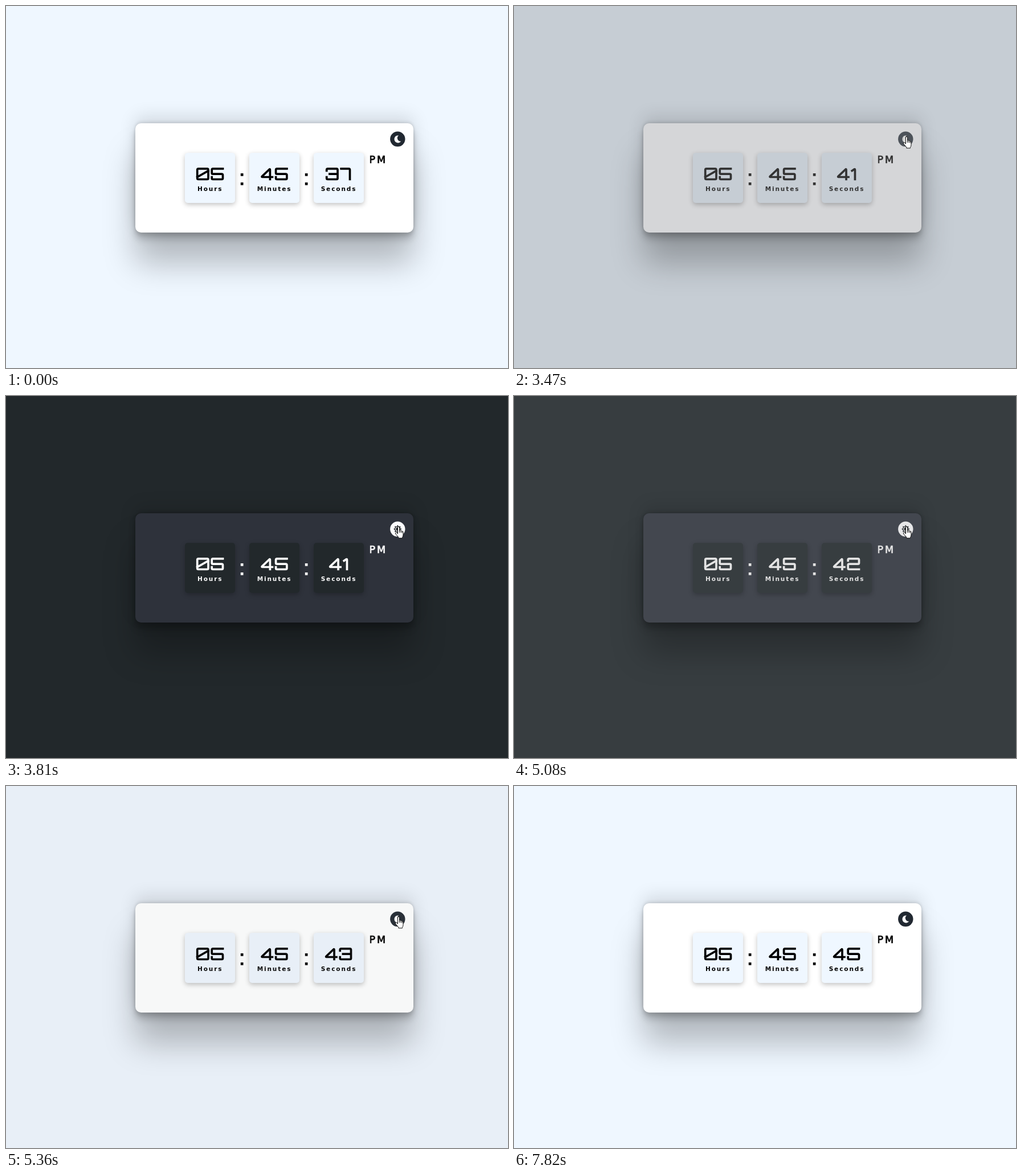
These frames come from a looping animation (881x636 px, 8.15 s). An HTML page:

```html
<!DOCTYPE html>
<html lang="en">
<head>
<meta charset="utf-8">
<title>Digital clock</title>
<style>
  html, body { margin: 0; width: 100%; height: 100%; overflow: hidden; }
  body { position: relative; background: var(--bg); }
  .card, .tile, svg { position: absolute; }
  .card {
    left: 227px; top: 206px; width: 488px; height: 192px;
    border-radius: 10px; background: var(--card);
    box-shadow: rgba(0,0,0,.25) 0 54px 55px, rgba(0,0,0,.12) 0 -12px 30px,
      rgba(0,0,0,.12) 0 4px 6px, rgba(0,0,0,.17) 0 12px 13px, rgba(0,0,0,.09) 0 -3px 5px;
  }
  .tile {
    top: 52px; width: 88px; height: 88px; border-radius: 5px;
    background: var(--bg); box-shadow: rgba(0,0,0,.24) 0 3px 8px;
  }
  svg { left: 0; top: 0; }
  text { font-family: "DejaVu Sans", sans-serif; fill: var(--fg); }
  .label { font-size: 10.5px; font-weight: bold; letter-spacing: 1.9px; text-anchor: middle; }
  .period { font-size: 17.5px; letter-spacing: 3px; stroke: var(--fg); stroke-width: .7px; }
  .digits path {
    fill: none; stroke: var(--fg); stroke-width: 3.7;
    stroke-linecap: square; stroke-linejoin: round;
  }
  .dots { fill: var(--fg); }
</style>
</head>
<body>
<div class="card">
  <div class="tile" style="left:87px"></div>
  <div class="tile" style="left:200px"></div>
  <div class="tile" style="left:313px"></div>
</div>
<svg width="881" height="636" viewBox="0 0 881 636">
  <g class="digits" id="hours" role="img"></g>
  <g class="digits" id="minutes" role="img"></g>
  <g class="digits" id="seconds" role="img"></g>
  <text class="label" x="358.2" y="324.7">Hours</text>
  <text class="label" x="471" y="324.7">Minutes</text>
  <text class="label" x="584" y="324.7">Seconds</text>
  <text class="period" x="637.4" y="275.7">PM</text>
  <path class="dots" d="M411.8 294h4.7v4.7h-4.7zm0 16h4.7v4.7h-4.7zM524.8 294h4.7v4.7h-4.7zm0 16h4.7v4.7h-4.7z"/>

  <circle cx="687.3" cy="233.8" r="13.2" fill="var(--btn)"/>
  <path id="moon" fill="var(--icon)" d="M689 227.5A6.5 6.5 0 1 0 693.3 237.6A5.7 5.7 0 0 1 689 227.5z"/>
  <g id="sun" transform="translate(687.3 233.8)">
    <path id="rays" fill="var(--icon)"/>
    <circle r="3.6" fill="none" stroke="var(--btn)" stroke-width="1.1"/>
  </g>

  <g id="cursor" stroke="#111" stroke-linejoin="round" fill="#fff">
    <path id="arrow" d="M.5 .7V15.2L3.8 12l2 4.6 2.2-1-2-4.4h4.2z"/>
    <g id="hand" transform="translate(-6.5 0)">
      <path d="M5 13V2Q5 .5 6.5 .5T8 2v5q1.7-.9 2.4.8 1.5-.7 2.2.8 1.9-.3 1.9 1.6v4.6q0 2.7-1.5 4.7v1.2H6.3v-1.6L1 13q-.7-1.7.8-2 1.2-.2 3.2 2z"/>
      <path fill="none" d="M8 7v4M10.4 8v3.2M12.6 9v2.6"/>
    </g>
  </g>
</svg>
<script>
const LOOP = 8150;
const $ = id => document.getElementById(id);
const mix = (a, b, k) => a + (b - a) * k;
const clamp = v => Math.min(1, Math.max(0, v));

// Digits are walks over a small grid: column letter, row number
const COLS = { l: 0, s: 5.2, m: 15.3, r: 19.3 };
const ROWS = [0, 3.6, 9.3, 14.6, 18.6];
const DIGITS = [
  'l2l0r0r4l4l2 l3r1', 'l1s0s4', 'l1l0r0r2l2l4r4', 'l1l0r0r4l4l3 s2r2', 'm4m0l3r3',
  'r0l0l2r2r4l4l3', 'r0l0l4r4r2l2', 'l0m0m4', 'l2l0r0r4l4l2r2', 'r2l2l0r0r4l4l3'
];
const STROKE = 3.7, GAP = 2.5, TOP = 285.9, CORNER = 2;

function toward([x, y], [tx, ty], dist) {
  const k = dist / Math.hypot(tx - x, ty - y);
  return [mix(x, tx, k), mix(y, ty, k)];
}

function roundedPath(walk) {
  const pts = walk.match(/../g).map(([c, r]) => [COLS[c], ROWS[r]]);
  return pts.map((p, i) => {
    if (i === 0) return `M${p}`;
    if (i === pts.length - 1) return `L${p}`;
    return `L${toward(p, pts[i - 1], CORNER)}Q${p} ${toward(p, pts[i + 1], CORNER)}`;
  }).join('');
}

const glyphs = DIGITS.map(walks => ({
  width: Math.max(...walks.match(/[a-z]/g).map(c => COLS[c])) + STROKE,
  d: walks.split(' ').map(roundedPath).join('')
}));

function setNumber(id, value, centre) {
  const group = $(id), text = String(value).padStart(2, '0');
  if (group.getAttribute('aria-label') === text) return;
  group.setAttribute('aria-label', text);
  const pair = [...text].map(c => glyphs[c]);
  let x = centre - (pair[0].width + pair[1].width + GAP - STROKE) / 2;
  group.innerHTML = pair.map(({ width, d }) => {
    const part = `<path transform="translate(${x} ${TOP})" d="${d}"/>`;
    x += width + GAP;
    return part;
  }).join('');
}

// [light, dark]
const THEME = {
  bg: [[239, 247, 255], [32, 38, 40]],
  card: [[255, 255, 255], [44, 48, 57]],
  fg: [[0, 0, 0], [255, 255, 255]],
  btn: [[33, 40, 49], [255, 255, 255]],
  icon: [[255, 255, 255], [33, 37, 41]]
};

// CSS "ease": cubic-bezier(.25, .1, .25, 1)
function ease(x) {
  let lo = 0, hi = 1, u = x;
  for (let i = 0; i < 20; i++) {
    u = (lo + hi) / 2;
    if (.75 * u * (1 - u) + u ** 3 < x) lo = u; else hi = u;
  }
  return .3 * u * (1 - u) ** 2 + 3 * u * u * (1 - u) + u ** 3;
}
const fade = (t, start, length) => ease(clamp((t - start) / length));

// Cursor visits as key points [ms, x, y]
const VISITS = [
  [[850, 848, 620], [910, 848, 604], [1660, 848, 604], [2000, 793, 340], [2140, 724, 227],
   [2470, 693, 222], [2700, 689, 229], [5780, 689, 229], [6360, 785, 545], [6540, 820, 640]],
  [[7400, 828, 640], [7560, 786, 543], [7780, 816, 640]]
];

function cursorAt(t) {
  for (const stops of VISITS) {
    const i = stops.findIndex(s => s[0] > t);
    if (i < 1) continue;
    const [t0, x0, y0] = stops[i - 1], [t1, x1, y1] = stops[i];
    const k = (t - t0) / (t1 - t0);
    return [mix(x0, x1, k), mix(y0, y1, k)];
  }
  return null;
}

const show = (id, on) => { $(id).style.display = on ? '' : 'none'; };

function draw(t) {
  const dark = fade(t, 3395, 485) - fade(t, 5034, 430);
  for (const [name, [light, night]] of Object.entries(THEME)) {
    const rgb = light.map((v, i) => Math.round(mix(v, night[i], dark)));
    document.body.style.setProperty('--' + name, `rgb(${rgb})`);
  }
  show('moon', dark < .5);
  show('sun', dark >= .5);

  setNumber('seconds', 38 + Math.floor((t - 280) / 1004), 583.1);

  const pos = cursorAt(t);
  show('cursor', pos);
  if (!pos) return;
  const over = Math.hypot(pos[0] - 687.3, pos[1] - 233.8) < 13.2;
  show('hand', over);
  show('arrow', !over);
  $('cursor').setAttribute('transform', `translate(${pos})`);
}

const rays = Array.from({ length: 16 }, (_, i) => {
  const r = i % 2 ? 5 : 7.2, a = i * Math.PI / 8;
  return [r * Math.cos(a), r * Math.sin(a)];
});
$('rays').setAttribute('d', `M${rays.join('L')}z`);
setNumber('hours', 5, 358.1);
setNumber('minutes', 45, 470.5);

const start = performance.now();
function frame() {
  draw((performance.now() - start) % LOOP);
  requestAnimationFrame(frame);
}
frame();
</script>
</body>
</html>
```
